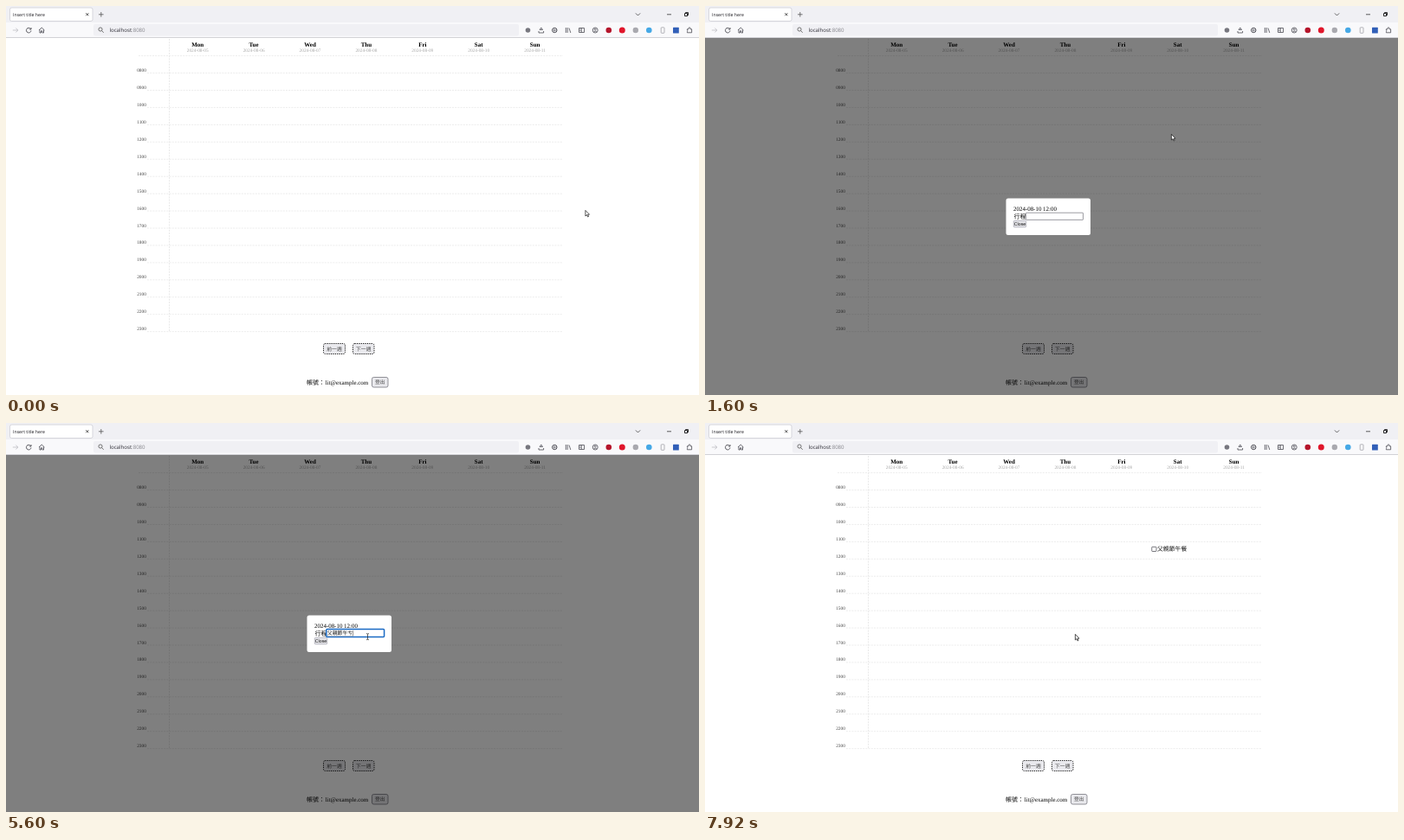
An HTML page with a canvas for the animation above (8 s loop, 800x450 px).

```html
<!DOCTYPE html>
<html lang="zh-Hant">
<head>
<meta charset="utf-8">
<title>Week planner</title>
<style>
html, body { margin: 0; width: 100%; height: 100%; overflow: hidden; background: #fff; }
canvas { display: block; width: 800px; height: 450px; }
</style>
</head>
<body>
<canvas id="stage" width="800" height="450"></canvas>
<script>
const ctx = document.getElementById('stage').getContext('2d');
const LOOP = 8000, STEP = 80;
const CJK = '"Noto Sans CJK TC", "Noto Sans CJK JP"';
const SERIF = `"Liberation Serif", ${CJK}, serif`;
const SANS = '"Open Sans", sans-serif';
const HAN = `${CJK}, sans-serif`;
const INK = '#4a4a52';
const EVENT = '父親節午餐';

// Phonetic input as it turns into characters
const TYPING = [
  [3120, 'ㄈ'], [3440, 'ㄈㄨ'], [3680, '父'],
  [4000, '父ㄑ'], [4240, '父ㄑㄧ'], [4400, '父ㄑㄧㄣ'], [4480, '父親'],
  [4720, '父親ㄐ'], [4800, '父親ㄐㄧ'], [5040, '父親ㄐㄧㄝ'], [5120, '父親節'],
  [5360, '父親節ㄨ'], [5440, '父親節午'],
  [5600, '父親節午ㄘ'], [5680, '父親節午ㄘㄢ'], [5840, EVENT],
];

function text(str, x, y, size, family, color = '#000', align = 'left', weight = '') {
  ctx.font = `${weight} ${size}px ${family}`;
  ctx.fillStyle = color;
  ctx.textAlign = align;
  ctx.fillText(str, x, y);
}

function box(x, y, w, h, r, fill, stroke, width = 1, dash = []) {
  ctx.beginPath();
  ctx.roundRect(x, y, w, h, r);
  if (fill) { ctx.fillStyle = fill; ctx.fill(); }
  if (stroke) {
    ctx.setLineDash(dash);
    ctx.strokeStyle = stroke;
    ctx.lineWidth = width;
    ctx.stroke();
    ctx.setLineDash([]);
  }
}

function path(d, color = INK, width = 0.8, x = 0, y = 0, fill) {
  ctx.save();
  ctx.translate(x, y);
  const p = new Path2D(d);
  if (fill) { ctx.fillStyle = fill; ctx.fill(p); }
  ctx.strokeStyle = color;
  ctx.lineWidth = width;
  ctx.stroke(p);
  ctx.restore();
}

function ring(x, y, r, color = INK, width = 0.8) {
  ctx.beginPath();
  ctx.arc(x, y, r, 0, 7);
  ctx.strokeStyle = color;
  ctx.lineWidth = width;
  ctx.stroke();
}

function dot(x, y, r, color) {
  ctx.beginPath();
  ctx.arc(x, y, r, 0, 7);
  ctx.fillStyle = color;
  ctx.fill();
}

function drawBrowser() {
  box(0, 0, 800, 19, 0, '#f0f0f4');
  box(0, 19, 800, 17, 0, '#f9f9fb');
  box(0, 36, 800, 1, 0, '#d2d2d6');
  box(4.5, 2, 95.5, 15.5, 2, '#fff', '#c9c9d0', 0.7);
  text('Insert title here', 8, 11.7, 5.2, SANS, '#15141a');
  path('M-1.5-1.5L1.5 1.5M1.5-1.5L-1.5 1.5', '#222', 0.8, 93.8, 9.7);
  path('M-2.8 0H2.8M0-2.8V2.8', '#555', 0.8, 109.8, 9.8);
  path('M-2.6-1.2L0 1.4L2.6-1.2', '#444', 0.8, 729.5, 9.6);
  path('M-2.5 0H2.5', '#333', 0.8, 765.5, 9.8);
  path('M-2-1H1V2H-2ZM-1-1V-2H2V1H1', '#111', 0.9, 785.5, 9.6);

  box(101, 21, 491, 13.5, 2, '#f0f0f4');
  ring(109, 27, 2.1, '#555');
  path('M110.6 28.6L112.7 30.8', '#555');
  text('localhost', 119.5, 30, 6.1, SANS, '#2b2a33');
  text(':8080', 119.5 + ctx.measureText('localhost').width, 30, 6.1, SANS, '#85858c');

  path('M-3 0H3M.5-2.5L3 0L.5 2.5', '#bcbcc2', 0.8, 10.8, 28);
  path('M2.3-1.5A2.8 2.8 0 1 0 2.8.5M2.8-3V-1H.8', INK, 0.9, 26.2, 28);
  path('M-3.2 0L0-3L3.2 0M-2.3-.6V3H-.7V.8H.7V3H2.3V-.6', INK, 0.8, 41.2, 28);

  dot(602.5, 28, 2.8, '#77777f');
  path('M-1.7-.5L0-3L1.7-.5ZM-2.8 1V3H2.8V1', INK, 0.8, 617.8, 28);
  ring(633.3, 28, 2.7, INK, 1);
  ring(633.3, 28, 1, INK, 0.7);
  path('M-2.7-3V3M-.8-3V3M1-2.5L2.8 3', INK, 0.8, 649, 28);
  path('M-3-2.5H3V2.5H-3ZM-.3-2.5V2.5M-2-1H-1M-2 .5H-1', INK, 0.8, 664.5, 28);
  ring(680.2, 28, 3, INK);
  ring(680.2, 27.2, 1, INK, 0.7);
  path('M-1.8 2Q0 .2 1.8 2', INK, 0.7, 680.2, 28);
  dot(695.8, 28, 3.3, '#b5152b');
  dot(711.3, 28, 3.5, '#e0162b');
  dot(726.8, 28, 3.2, '#a9a9af');
  dot(742.3, 28, 3.3, '#45a8e6');
  box(756.2, 24.8, 3.8, 6.5, 0.7, null, '#96969d', 0.7);
  box(770, 24.7, 6.8, 6.8, 0.5, '#315fb8');
  path('M-2.6-1H-1V-2A1 1 0 0 1 1-2V-1H2.6V3H-2.6V1.8A.9.9 0 0 0-2.6 .2Z', INK, 0.8, 789, 27.8);
}

function button(label, x, y, w, h, dotted) {
  box(x, y, w, h, 2, '#e9e9ed', dotted ? '#111' : '#77777f', dotted ? 1 : 0.8, dotted ? [1.2, 1.2] : []);
  text(label, x + w / 2, y + h / 2 + 2.1, 5.8, HAN, '#444', 'center');
}

function drawCalendar(hasEvent) {
  box(0, 37, 800, 413, 0, '#fff');
  ctx.setLineDash([2, 1.2]);
  path('M188.5 38V377', '#e4e4e4', 0.8);
  for (let i = 0; i <= 16; i++) {
    path(`M${i ? 163 : 153} ${57.6 + i * 19.94}H643`, '#e8e8e8', 0.8);
  }
  ctx.setLineDash([]);

  ['Mon', 'Tue', 'Wed', 'Thu', 'Fri', 'Sat', 'Sun'].forEach((day, i) => {
    const x = 221.2 + i * 64.9;
    text(day, x, 46.9, 7, SERIF, '#000', 'center', 'bold');
    text(`2024-08-${String(5 + i).padStart(2, '0')}`, x, 53.2, 5.35, SERIF, '#a6a6a6', 'center');
  });
  for (let hour = 8; hour <= 23; hour++) {
    text(`${String(hour).padStart(2, '0')}00`, 151.2, 76.4 + (hour - 8) * 19.9, 5.35, SERIF, '#444');
  }

  button('前一週', 366.5, 390.5, 25, 12, true);
  button('下一週', 400.5, 390.5, 24.5, 12, true);
  text('帳號：', 347, 438, 7, SERIF);
  text('lit@example.com', 368.8, 437.6, 6.95, SERIF);
  button('登出', 422.5, 429.5, 18.5, 11.5, false);

  if (hasEvent) {
    box(515.8, 143.3, 5.2, 5.2, 0.6, '#fff', '#55555c', 0.8);
    text(EVENT, 522, 148.1, 6.85, SERIF, '#111');
  }
}

function drawDialog(t) {
  box(0, 37, 800, 413, 0, 'rgba(0,0,0,.5)');
  box(347.5, 222.5, 97.5, 42.5, 2.5, '#fff');
  text('2024-08-10 12:00', 356, 237, 6.95, SERIF);
  text('行程', 356.5, 245.7, 7, SERIF);

  const focused = t >= 2480;
  if (focused) box(369.8, 238.4, 66.8, 9.2, 1, '#fff', '#1a6ac4', 1.5);
  else box(370.5, 239.2, 66, 8.2, 0.5, '#fff', '#85858c', 0.8);
  box(356.3, 248.4, 14.4, 7.4, 1, '#e9e9ed', '#8f8f9d', 0.6);
  text('Close', 363.5, 254, 5.3, '"Liberation Sans", sans-serif', '#000', 'center');
  if (!focused) return;

  const typed = TYPING.filter(([at]) => at <= t).pop()?.[1] ?? '';
  text(typed, 370.8, 245.3, 5.9, HAN, '#111');
  const end = 370.8 + ctx.measureText(typed).width;
  if (typed && t < 6240) path(`M371 246.6H${end}`, '#999', 0.4);
  path(`M${end + 0.3} 240.2V246.4`, '#222', 0.5);
}

function glide(t, start, end, from, to, sag = 0) {
  const p = Math.min(1, Math.max(0, (t - start) / (end - start)));
  const e = p * p * (3 - 2 * p);
  return [
    from[0] + (to[0] - from[0]) * e,
    from[1] + (to[1] - from[1]) * e + sag * Math.sin(Math.PI * e),
  ];
}

function pointerAt(t) {
  const rest = [668.5, 236], slot = [538, 148], field = [413.7, 243];
  if (t < 1760) return glide(t, 400, 1440, rest, slot);
  if (t < 7600) return glide(t, 1760, 2320, slot, field, 28);
  return glide(t, 7600, 7920, field, [427, 244]);
}

function drawPointer(t) {
  if (t >= 2320 && t < 6640) {
    path('M-1.4-3.5H-.4L0-3L.4-3.5H1.4M0-3V3M-1.4 3.5H-.4L0 3L.4 3.5H1.4', '#222', 0.7, 417.5, 247.2);
    return;
  }
  const [x, y] = pointerAt(t);
  path('M.4.4V7L2 5.6L3.1 8L4.1 7.5L3.1 5.2H5Z', '#111', 0.7, x, y, '#fff');
}

function frame(now) {
  const t = Math.floor((now % LOOP) / STEP) * STEP;
  ctx.textRendering = 'geometricPrecision';
  drawBrowser();
  drawCalendar(t >= 6800);
  if (t >= 1600 && t < 6800) drawDialog(t);
  drawPointer(t);
  requestAnimationFrame(frame);
}
requestAnimationFrame(frame);
</script>
</body>
</html>
```
